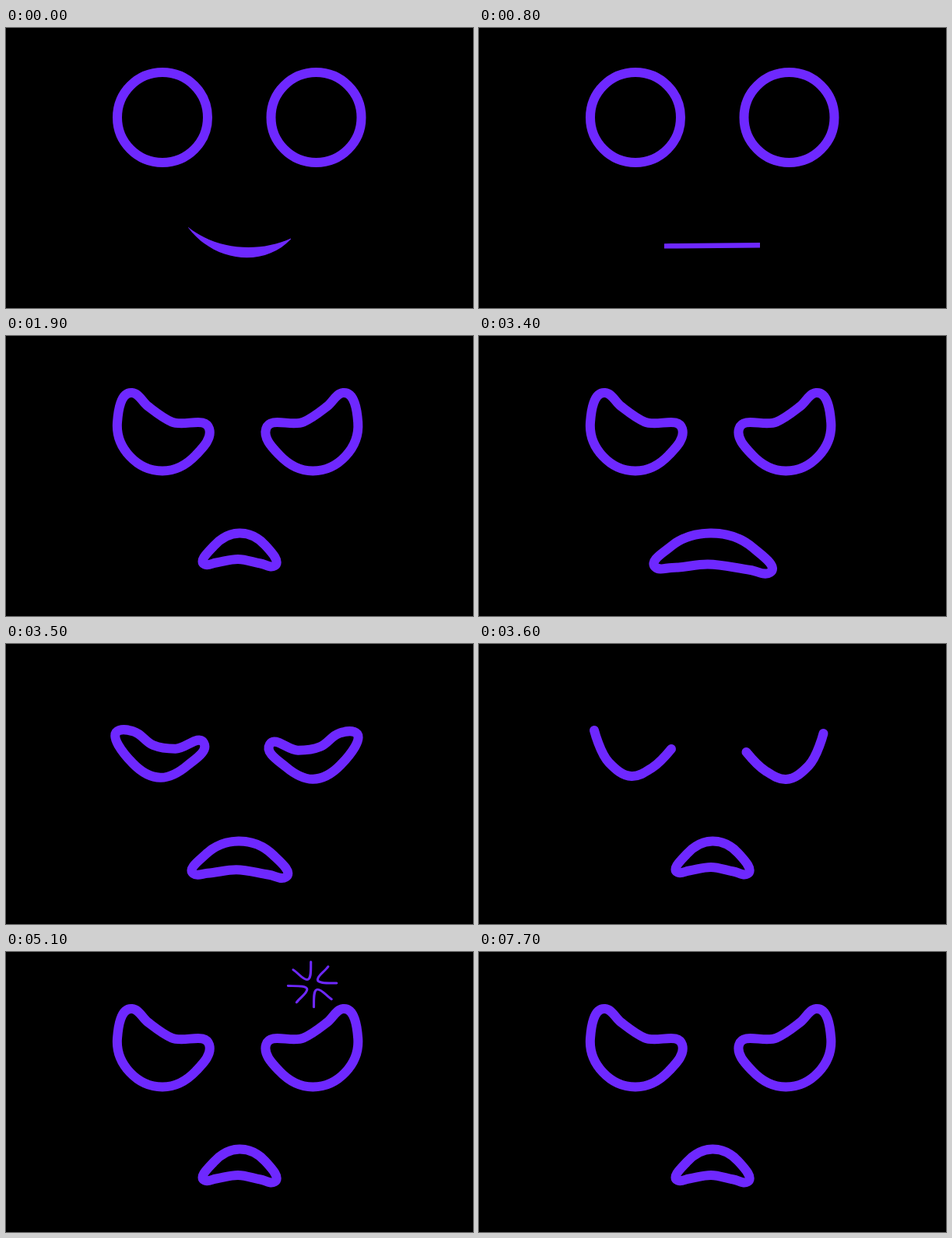
Animation, 600 px wide and 360 px high, one loop 8000 ms. Source, as an HTML page:

```html
<!DOCTYPE html>
<html lang="en">
<head>
<meta charset="utf-8">
<title>Moody face</title>
<style>
  html, body { margin: 0; width: 100%; height: 100%; overflow: hidden; background: #000; }
  svg { display: block; width: 100%; height: 100%; }
  path { fill: none; stroke: #6e28ff; stroke-linejoin: round; stroke-linecap: round; }
  .eye { stroke-width: 12; }
  #lips { fill: #6e28ff; stroke: none; }
  #mark { stroke-width: 3; }
</style>
</head>
<body>
<svg viewBox="0 0 600 360">
  <defs><path id="vein" d="M-23.7 -19.5C-17 -15 -12 -6.5 -6.5 -6.5S-2 -20 -1.8 -30"/></defs>
  <path id="left" class="eye"/>
  <path id="right" class="eye"/>
  <path id="lips"/>
  <path id="mouth"/>
  <g id="mark" transform="translate(393.6 41.8) scale(1.04 .97)">
    <use href="#vein"/>
    <use href="#vein" transform="rotate(90)"/>
    <use href="#vein" transform="rotate(180)"/>
    <use href="#vein" transform="rotate(270)"/>
  </g>
</svg>
<script>
const LOOP = 8000, STEP = 100;
const $ = id => document.getElementById(id);

const mix = (a, b, u) =>
  Array.isArray(a) ? a.map((v, i) => mix(v, b[i], u)) : a + (b - a) * u;
const row = (n, a, b) => Array.from({ length: n }, (_, i) => mix(a, b, i / (n - 1)));
const ring = (n, cx, cy, r) => Array.from({ length: n }, (_, i) => {
  const a = Math.PI * (1 + 2 * i / n);
  return [cx + r * Math.cos(a), cy + r * Math.sin(a)];
});
// A line walked there and back, as a closed shape.
const fold = pts => [...pts, ...pts.slice(1, -1).reverse()];

// Closed curve through points; each tangent is that of the circle through its neighbours.
function smooth(pts) {
  const n = pts.length;
  const edges = pts.map(([x, y], i) => {
    const [nx, ny] = pts[(i + 1) % n], len = Math.hypot(nx - x, ny - y) || 1;
    return { x: (nx - x) / len, y: (ny - y) / len, len };
  });
  const tangents = edges.map((out, i) => {
    const back = edges[(i + n - 1) % n];
    const x = back.x * out.len + out.x * back.len;
    const y = back.y * out.len + out.y * back.len;
    const len = Math.hypot(x, y) || 1;
    return [x / len, y / len];
  });
  const handle = (i, k) => pts[i].map((v, axis) => v + tangents[i][axis] * k);
  return `M${pts[0]}` + edges.map(({ len }, i) => {
    const j = (i + 1) % n;
    return `C${handle(i, len * .35)} ${handle(j, -len * .35)} ${pts[j]}`;
  }).join('') + 'Z';
}

// Two cubic edges joined at both ends.
const crescent = p => `M${p[0]}C${p.slice(1, 4)}L${p[4]}C${p.slice(5)}Z`;

// Eye pose: points of the left eye, then [x sum, y shift] of its mirror image.
const round = [ring(8, 201, 115, 58), [599.5, 0]];
const angry = [[[143, 111], [162, 73], [182, 90], [213, 110.5],
  [261, 119], [244, 153], [201, 173.5], [159, 154.5]], [595.2, 0]];
const droop = [[[143, 116], [151, 98], [169.5, 117], [208, 135.3],
  [255.3, 131], [239.5, 157], [200, 174], [159.5, 156.5]], [592, 0]];
const shut = [fold([[148, 111], [167, 152.5], [196, 170], [222.6, 159], [247, 135]]), [590.5, 4]];

// Filled lips
const smile = [[234, 256], [272, 286], [325, 289], [366, 270.5],
  [366, 271.5], [332, 308], [268, 302], [234, 256.5]];
const line = [...row(4, [238, 277.2], [361, 276]), ...row(4, [361, 282.5], [238, 283.6])];

// Open mouth: points, then stroke width.
const flat = [fold(row(5, [235, 280], [366, 280])), 8];
const frown = [[[255, 293.5], [267, 270], [300, 253.5], [333, 269],
  [344.8, 295.5], [327, 292.5], [298, 287], [270, 291.5]], 12];
const wide = [[[226.5, 297], [246, 271], [297, 253.5], [352, 272.3],
  [374, 304], [349, 301], [294, 293.5], [247.5, 298]], 12];

// Tracks of [time, pose]
const eyes = [[0, round], [900, round], [1100, angry], [3400, angry], [3600, shut],
  [3700, shut], [3900, droop], [4900, droop], [5100, angry], [LOOP, angry]];
const lips = [[0, smile], [600, smile], [800, line], [LOOP, line]];
const mouth = [[0, flat], [1400, flat], [1900, frown], [3300, frown],
  [3400, wide], [3600, frown], [LOOP, frown]];

function at(track, t) {
  const i = track.findIndex(([time]) => time > t);
  const [t0, a] = track[i - 1], [t1, b] = track[i];
  return mix(a, b, (t - t0) / (t1 - t0));
}

const show = (id, on) => $(id).style.display = on ? '' : 'none';

function draw(time) {
  const t = Math.floor(time % LOOP / STEP) * STEP;

  const [eye, [sum, dy]] = at(eyes, t);
  $('left').setAttribute('d', smooth(eye));
  $('right').setAttribute('d', smooth(eye.map(([x, y]) => [sum - x, y + dy])));

  const [open, width] = at(mouth, t);
  $('lips').setAttribute('d', crescent(at(lips, t)));
  $('mouth').setAttribute('d', smooth(open));
  $('mouth').setAttribute('stroke-width', width);

  show('lips', t < 1500);
  show('mouth', t >= 1500);
  show('mark', t >= 4300 && t < 7700);
}

const start = performance.now();
function tick() {
  draw(performance.now() - start);
  requestAnimationFrame(tick);
}
tick();
</script>
</body>
</html>
```
